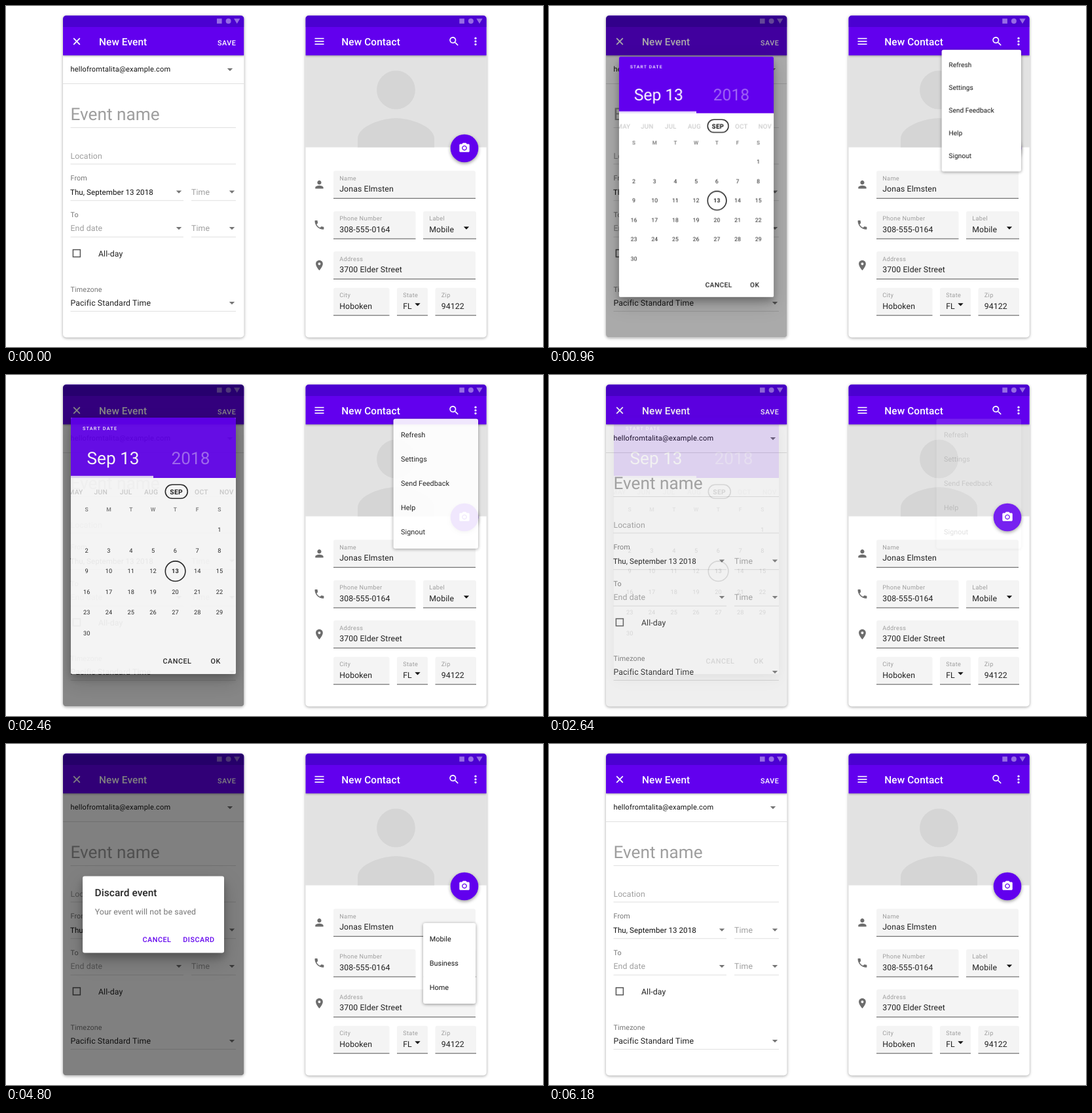
These frames come from a looping animation (820 px wide and 520 px high, 7020 ms). An HTML page:

```html
<!DOCTYPE html>
<html lang="en">
<head>
<meta charset="utf-8">
<title>Dialogs and menus</title>
<style>
html, body { margin: 0; width: 100%; height: 100%; overflow: hidden; background: #fff; }
svg { display: block; width: 820px; height: 520px; font-family: Roboto, Arial, sans-serif; text-rendering: geometricPrecision; }
text { white-space: pre; }

.phone { filter: drop-shadow(0 1.5px 2px rgba(0,0,0,.36)); }
.bar { filter: drop-shadow(0 1.5px 1.5px rgba(0,0,0,.32)); }
.fab { filter: drop-shadow(0 2px 2.5px rgba(0,0,0,.4)); }
.sheet { filter: drop-shadow(0 1.5px 2.5px rgba(0,0,0,.42)); }
.card { filter: drop-shadow(0 7px 6px rgba(0,0,0,.22)) drop-shadow(0 10px 14px rgba(0,0,0,.2)); }

.anim, .scrim, .tap { opacity: 0; animation: 7.02s linear infinite; }
.picker { transform-origin: 225px 260.5px; animation-name: show1, grow1; }
.more { transform-origin: 721px 66.5px; animation-name: show1, grow1; }
.discard { transform-origin: 225px 260px; animation-name: show2, grow2; }
.labels { transform-origin: 677px 334.5px; animation-name: showLabels, grow2; }
.scrim { animation-name: dim; }
.tap { transform-box: fill-box; transform-origin: center; }
.tap1 { animation-name: tap1; }
.tap2 { animation-name: tap2; }
.tap3 { animation-name: tap3; }

@keyframes show1 {
  0%, 9.402% { opacity: 0; }
  13.248%, 34.758% { opacity: 1; }
  38.034%, 100% { opacity: 0; }
}
@keyframes grow1 {
  0%, 9.402% { transform: scale(.8); animation-timing-function: cubic-bezier(0,0,.2,1); }
  22.222%, 100% { transform: scale(1); }
}
@keyframes show2 {
  0%, 55.983% { opacity: 0; }
  59.829%, 84.615% { opacity: 1; }
  88.034%, 100% { opacity: 0; }
}
@keyframes showLabels {
  0%, 55.983% { opacity: 0; }
  59.829%, 82.906% { opacity: 1; }
  88.034%, 100% { opacity: 0; }
}
@keyframes grow2 {
  0%, 55.983% { transform: scale(.8); animation-timing-function: cubic-bezier(0,0,.2,1); }
  68.803%, 100% { transform: scale(1); }
}
@keyframes dim {
  0%, 9.402% { opacity: 0; }
  15.812%, 34.9% { opacity: .5; }
  38.034%, 55.983% { opacity: 0; }
  62.393%, 84.9% { opacity: .5; }
  88.034%, 100% { opacity: 0; }
}
@keyframes tap1 {
  0%, 5.96% { opacity: 0; transform: scale(1); }
  5.97% { opacity: 1; transform: scale(1); }
  9.402% { opacity: 1; transform: scale(1.15); }
  12.821%, 100% { opacity: 0; transform: scale(1.2); }
}
@keyframes tap2 {
  0%, 53.39% { opacity: 0; transform: scale(1); }
  53.4% { opacity: 1; transform: scale(1); }
  55.983% { opacity: 1; transform: scale(1.15); }
  59.402%, 100% { opacity: 0; transform: scale(1.2); }
}
@keyframes tap3 {
  0%, 53.83% { opacity: 0; transform: scale(1); }
  53.84% { opacity: 1; transform: scale(1); }
  55.983% { opacity: 1; transform: scale(1.15); }
  59.402%, 100% { opacity: 0; transform: scale(1.2); }
}
</style>
</head>
<body>
<svg id="stage" viewBox="0 0 820 520"></svg>
<script>
const PURPLE = '#6200ee', INK = '#212121', GREY = '#757575', HINT = '#9e9e9e', RULE = '#e0e0e0';

const text = (s, x, y, size, fill, { ls = .1, w = 400, mid = false } = {}) =>
  `<text x="${x}" y="${y}" font-size="${size}" fill="${fill}" font-weight="${w}" letter-spacing="${ls}"${mid ? ' text-anchor="middle"' : ''}>${s}</text>`;
const rect = (x, y, w, h, fill, extra = '') =>
  `<rect x="${x}" y="${y}" width="${w}" height="${h}" fill="${fill}" ${extra}/>`;
const circle = (x, y, r, fill, extra = '') =>
  `<circle cx="${x}" cy="${y}" r="${r}" fill="${fill}" ${extra}/>`;
const path = (d, fill, extra = '') => `<path d="${d}" fill="${fill}" ${extra}/>`;
const icon = (d, x, y, fill) => path(d, fill, `transform="translate(${x} ${y}) scale(.77)"`);
const caret = (x, y, fill = GREY) => path(`M${x - 4.2} ${y - 2}h8.4l-4.2 4.2z`, fill);
const rule = (x1, x2, y) => rect(x1, y - .5, x2 - x1, 1, RULE);
const button = (s, x, y, fill) => text(s, x, y, 10.8, fill, { ls: .5, w: 500 });
const tap = (cls, x, y, fill) => circle(x, y, 18, fill, `class="tap ${cls}"`);
const SHADE = 'rgba(0,0,0,.08)', GLOW = 'rgba(255,255,255,.22)';

function phone(x, id, title, body, over) {
  const status = 'rgba(255,255,255,.42)';
  return `<clipPath id="${id}">${rect(x, 14.5, 276.5, 491, '#000', 'rx="5"')}</clipPath>
    ${rect(x, 14.5, 276.5, 491, '#fff', 'rx="5" class="phone"')}
    <g clip-path="url(#${id})">
      ${body}
      ${rect(x, 14, 276.5, 61.3, PURPLE, 'class="bar"')}
      ${rect(x, 14, 276.5, 18, '#4b01d1')}
      ${rect(x + 235, 19.2, 7.6, 7.6, status)}
      ${circle(x + 252.6, 23, 4, status)}
      ${path(`M${x + 261} 19.3h9.4l-4.7 7.6z`, status)}
      ${text(title, x + 55, 60, 15.4, '#fff', { w: 500 })}
      ${over}
    </g>`;
}

function eventForm() {
  let s = text('hellofromtalita@example.com', 98.5, 100, 11, '#111', { ls: .2 }) + caret(342, 97) + rule(87, 364, 118.5);
  s += text('Event name', 98.5, 174, 26.2, HINT, { ls: 0 }) + rule(98.5, 351, 185.5);
  s += text('Location', 98.5, 232.5, 12.3, HINT) + rule(98.5, 351, 241);
  s += text('From', 98.5, 266, 10.8, GREY) + text('Thu, September 13 2018', 98, 287.5, 11.55, '#111', { ls: .06 });
  s += text('To', 98.5, 321.5, 10.8, GREY) + text('End date', 98.5, 343, 12.3, HINT);
  for (const y of [283.5, 339]) {
    s += caret(264, y) + caret(345, y) + text('Time', 283, y + 4.2, 12.3, HINT);
    s += rule(98.5, 271, y + 13.2) + rule(283, 351, y + 13.2);
  }
  s += rect(102.4, 371.6, 11, 11, 'none', 'stroke="#555" stroke-width="1.5"') + text('All-day', 141, 382, 12.3, INK);
  s += text('Timezone', 98.5, 436, 10.8, GREY) + text('Pacific Standard Time', 98.5, 457, 12.3, INK);
  return s + caret(345, 453) + rule(98.5, 351, 465.5) + tap('tap1', 184, 284, SHADE);
}

function datePicker() {
  let s = rect(99, 65, 252, 391, '#fff', 'rx="2" class="card"') + rect(99, 65, 252, 92, PURPLE);
  s += text('START DATE', 117, 83.7, 7.2, '#fff', { ls: 1.25, w: 500 });
  s += text('Sep 13', 123.5, 135.8, 26.2, '#fff', { ls: 0 }) + text('2018', 252.5, 135.8, 26.2, 'rgba(255,255,255,.4)', { ls: 0 });
  s += rect(99, 153.8, 126, 3.2, '#e6d9fc');
  'MAY JUN JUL AUG SEP OCT NOV'.split(' ').forEach((m, i) => {
    const on = m === 'SEP';
    s += text(m, 106.5 + i * 38.4, 181.7, 10.3, on ? '#111' : '#cfcfcf', { ls: .3, w: on ? 700 : 500, mid: true });
  });
  s += rect(243.3, 167.3, 34, 21, 'none', `rx="10.5" stroke="${INK}" stroke-width="1.6"`);
  const col = i => 123.2 + i * 33.8;
  [...'SMTWTFS'].forEach((d, i) => s += text(d, col(i), 208.3, 8.6, GREY, { w: 500, mid: true }));
  for (let d = 1; d <= 30; d++) {
    const y = 239.3 + Math.floor((d + 5) / 7) * 31.5;
    s += text(d, col((d + 5) % 7), y, 9.2, INK, { w: d === 13 ? 700 : 400, mid: true });
  }
  s += circle(258.6, 299.2, 15.3, 'none', `stroke="${INK}" stroke-width="1.6"`);
  s += button('CANCEL', 239.5, 440, INK) + button('OK', 312.5, 440, INK);
  return `<clipPath id="days"><path d="M40 40H410V162H351V500H410V520H40V500H99V162H40z"/></clipPath>
    <g class="anim picker"><g clip-path="url(#face)">${s}</g></g>`
    .replace(/<clipPath id="days">.*?<\/clipPath>/, `<clipPath id="face">${rect(99, 65, 252, 391, '#000', 'rx="2"')}</clipPath>`)
    .replace('<g class="anim picker">', `<g class="anim picker">${rect(99, 65, 252, 391, '#fff', 'rx="2" class="card"')}`);
}

function discardDialog() {
  return `<g class="anim discard">
    ${rect(117, 201.5, 216, 117, '#fff', 'rx="3" class="card"')}
    ${text('Discard event', 135.5, 232, 15.4, INK, { w: 500 })}
    ${text('Your event will not be saved', 135.7, 260, 12.3, GREY)}
    ${button('CANCEL', 208.5, 302, PURPLE)}${button('DISCARD', 270.3, 302, PURPLE)}
  </g>`;
}

function field(x, y, w, label, value, arrowX) {
  return path(`M${x} ${y + 42}v-39q0-3 3-3h${w - 6}q3 0 3 3v39z`, '#f4f4f4') + rect(x, y + 41.5, w, 1, '#555')
    + text(label, x + 9.2, y + 14.2, 9.2, HINT, { ls: .35 }) + text(value, x + 9.2, y + 31.9, 12.3, INK, { ls: .12 })
    + (arrowX ? caret(arrowX, y + 25.5, '#111') : '');
}

function contactForm() {
  const dark = '#6d6d6d';
  const person = 'M12 12c2.21 0 4-1.79 4-4s-1.79-4-4-4-4 1.79-4 4 1.79 4 4 4zm0 2c-2.67 0-8 1.34-8 4v2h16v-2c0-2.66-5.33-4-8-4z';
  const call = 'M6.62 10.79c1.44 2.83 3.76 5.14 6.59 6.59l2.2-2.2c.27-.27.67-.36 1.02-.24 1.12.37 2.33.57 3.57.57.55 0 1 .45 1 1V20c0 .55-.45 1-1 1-9.39 0-17-7.61-17-17 0-.55.45-1 1-1h3.5c.55 0 1 .45 1 1 0 1.25.2 2.45.57 3.57.11.35.03.74-.25 1.02l-2.2 2.2z';
  const pin = 'M12 2C8.13 2 5 5.13 5 9c0 5.25 7 13 7 13s7-7.75 7-13c0-3.87-3.13-7-7-7zm0 9.5c-1.38 0-2.5-1.12-2.5-2.5s1.12-2.5 2.5-2.5 2.5 1.12 2.5 2.5-1.12 2.5-2.5 2.5z';
  const camera = 'M9 2L7.17 4H4c-1.1 0-2 .9-2 2v12c0 1.1.9 2 2 2h16c1.1 0 2-.9 2-2V6c0-1.1-.9-2-2-2h-3.17L15 2H9zm3 15c-2.76 0-5-2.24-5-5s2.24-5 5-5 5 2.24 5 5-2.24 5-5 5z';
  return rect(457, 75, 277, 140.5, '#e2e2e2') + circle(595.5, 128, 29.4, '#d5d5d5')
    + path('M537 215.5v-13c0-20 39-31.5 58.5-31.5s58.5 11.5 58.5 31.5v13z', '#d5d5d5')
    + circle(700, 217, 21.3, PURPLE, 'class="fab"') + icon(camera, 690.8, 207.3, '#fff') + circle(700, 216.5, 2.5, '#fff')
    + icon(person, 469.2, 263, dark) + icon(call, 469.2, 324.7, dark) + icon(pin, 469.2, 386.3, dark)
    + field(500, 251.3, 217, 'Name', 'Jonas Elmsten')
    + field(500, 313, 125.5, 'Phone Number', '308-555-0164')
    + field(637, 313, 81, 'Label', 'Mobile', 703)
    + field(500, 374.3, 217, 'Address', '3700 Elder Street')
    + field(500, 429.8, 85.5, 'City', 'Hoboken')
    + field(597, 429.8, 47, 'State', 'FL', 628.5)
    + field(655.5, 429.8, 62.5, 'Zip', '94122')
    + tap('tap2', 677, 334, SHADE);
}

function menu(cls, x, y, w, h, tx, items) {
  return `<g class="anim ${cls}">${rect(x, y, w, h, '#fff', 'rx="3" class="sheet"')}${
    items.map((s, i) => text(s, tx, y + 28.2 + i * 37.1, 10.8, '#111', { ls: .05 })).join('')}</g>`;
}

const search = 'M15.5 14h-.79l-.28-.27C15.41 12.59 16 11.11 16 9.5 16 5.91 13.09 3 9.5 3S3 5.91 3 9.5 5.91 16 9.5 16c1.61 0 3.09-.59 4.23-1.57l.27.28v.79l5 4.99L20.49 19l-4.99-5zm-6 0C7.01 14 5 11.99 5 9.5S7.01 5 9.5 5 14 7.01 14 9.5 11.99 14 9.5 14z';
const close = path('M103.2 49.2l9.6 9.6M112.8 49.2l-9.6 9.6', 'none', 'stroke="#fff" stroke-width="1.7"');
const burger = [49.6, 53.9, 58.2].map(y => rect(471.5, y - .8, 14, 1.6, '#fff')).join('');
const dots = [49.2, 53.9, 58.6].map(y => circle(717, y, 1.6, '#fff')).join('');

document.getElementById('stage').innerHTML =
  phone(87, 'left', 'New Event', eventForm(),
    close + text('SAVE', 323, 60, 10.8, '#fff', { ls: .5, w: 500 }) + tap('tap3', 108, 54, GLOW)
    + rect(87, 14.5, 276.5, 491, '#000', 'class="scrim"') + datePicker() + discardDialog())
  + phone(457.3, 'right', 'New Contact', contactForm(),
    burger + icon(search, 675, 44.8, '#fff') + dots + tap('tap1', 717, 54, GLOW)
    + menu('more', 591.5, 66.8, 129.5, 198, 603, ['Refresh', 'Settings', 'Send Feedback', 'Help', 'Signout'])
    + menu('labels', 637, 273, 80.3, 123, 646.8, ['Mobile', 'Business', 'Home']));
</script>
</body>
</html>
```
